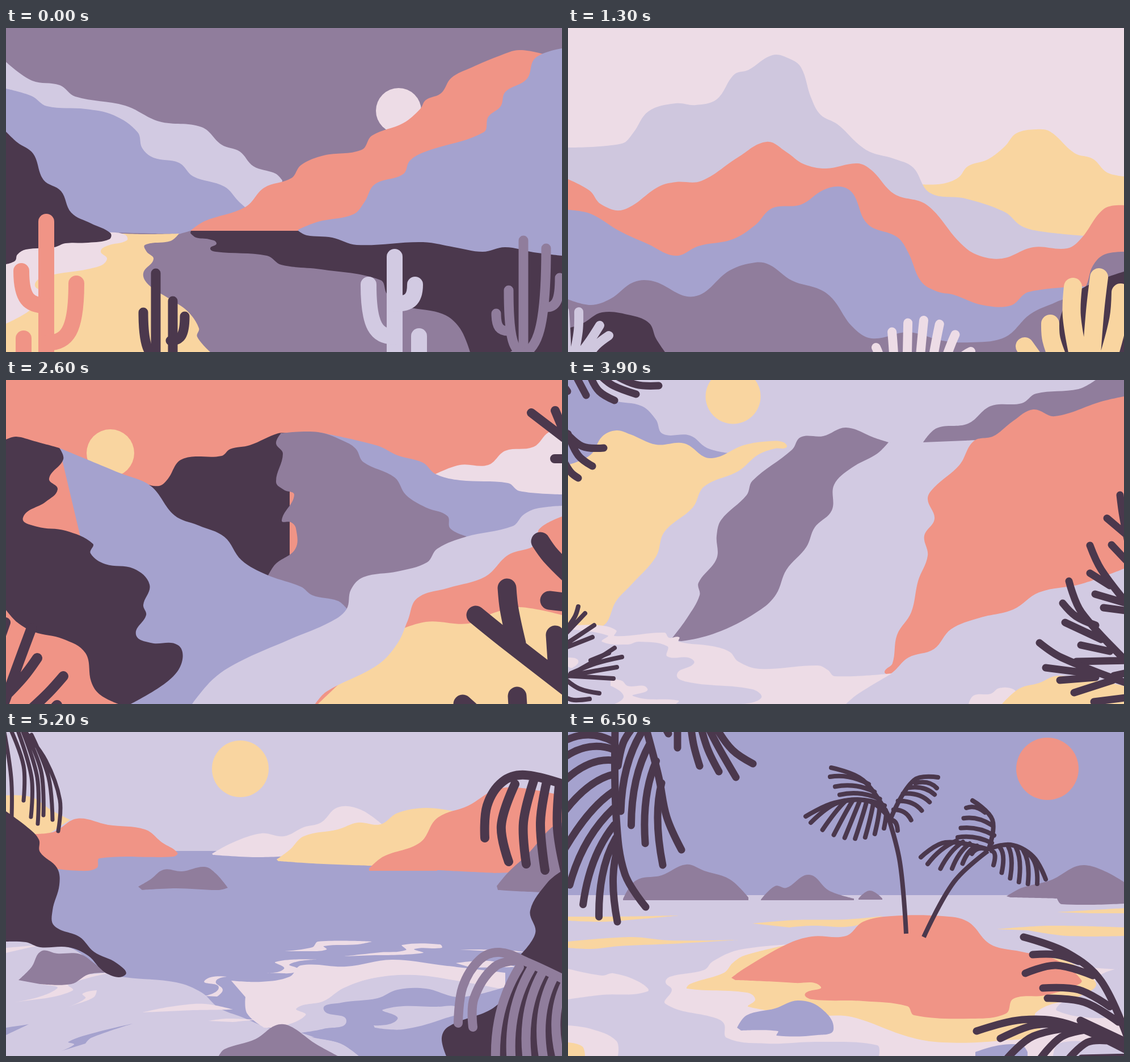
Write an HTML page that moves like this. It is 980 by 572 pixels and loops after 7.8 s.

```html
<!DOCTYPE html>
<html lang="en">
<head>
<meta charset="utf-8">
<title>Six landscapes</title>
<style>
html, body { margin: 0; width: 100%; height: 100%; overflow: hidden; }
svg { display: block; width: 100%; height: 100%; }
</style>
</head>
<body>
<svg id="stage" viewBox="0 0 980 572"></svg>
<script>
const PLUM = '#907d9c', LILAC = '#d2cae2', BLUE = '#a5a2ce', CORAL = '#f09486',
      DARK = '#4b384d', SAND = '#f9d5a0', PINK = '#eddce6', MIST = '#cfc7de';
const HOLD = 1300;
let art = '';

// Smooth curve through "x,y" points; "!" marks a sharp corner.
function curve(text) {
  const pts = text.split(' ').map((s, i, all) => {
    const [x, y] = s.replace('!', '').split(',').map(Number);
    return { x, y, sharp: s.endsWith('!') || i === 0 || i === all.length - 1 };
  });
  const dir = i => {
    if (pts[i].sharp) return [0, 0];
    const dx = pts[i + 1].x - pts[i - 1].x, dy = pts[i + 1].y - pts[i - 1].y;
    const d = Math.hypot(dx, dy) || 1;
    return [dx / d, dy / d];
  };
  return pts.reduce((d, b, i) => {
    if (!i) return `M${b.x} ${b.y}`;
    const a = pts[i - 1], u = dir(i - 1), v = dir(i);
    const k = 0.36 * Math.hypot(b.x - a.x, b.y - a.y);
    return d + `C${a.x + u[0] * k} ${a.y + u[1] * k} ${b.x - v[0] * k} ${b.y - v[1] * k} ${b.x} ${b.y}`;
  }, '');
}

const draw = (color, d) => { art += `<path fill="${color}" d="${d}Z"/>`; };
const stroke = (color, width, d, cap = 'round') => {
  art += `<path fill="none" stroke="${color}" stroke-width="${width}" stroke-linecap="${cap}" d="${d}"/>`;
};
const fill = (color, text) => draw(color, curve(text));
// A ridge closed straight down to a base line.
const land = (color, base, text) => draw(color, `${curve(text)}V${base}H${text.split(',')[0]}`);
const line = (color, width, ...parts) => stroke(color, width, parts.map(curve).join(''));
const trunk = (color, width, x, y) => stroke(color, width, `M${x} ${y}V600`);
const arm = (color, width, x, y, tx, ty) =>
  stroke(color, width, `M${x} ${y}C${x} ${y + (ty - y) * 0.8} ${x + (tx - x) * 0.3} ${ty} ${tx} ${ty}`);
const disc = (color, x, y, r) => { art += `<circle fill="${color}" cx="${x}" cy="${y}" r="${r}"/>`; };
const band = (color, y = 0) => { art += `<rect fill="${color}" y="${y}" width="980" height="${572 - y}"/>`; };

// Point at t on the parabola through three points.
function along(text, t) {
  const [a, m, b] = text.split(' ').map(s => s.split(',').map(Number));
  const s = 2 * t - 1;
  return m.map((v, i) => v + s * (b[i] - a[i]) / 2 + s * s * ((a[i] + b[i]) / 2 - v));
}

// n bent leaflets running from a curve of roots to a curve of tips.
function fan(color, width, n, roots, tips, bx, by) {
  let d = '';
  for (let i = 0; i < n; i++) {
    const [x, y] = along(roots, i / (n - 1)), [p, q] = along(tips, i / (n - 1));
    d += `M${x} ${y}Q${(x + p) / 2 + 2 * bx} ${(y + q) / 2 + 2 * by} ${p} ${q}`;
  }
  stroke(color, width, d);
}

function canyon() {
  band(PLUM);
  land(LILAC, 340, '0,60 46,93 95,101 122,121 210,137 270,165 345,175 380,206 412,218 436,244 475,257 487,269! 480,330');
  disc(PINK, 692, 146, 40);
  land(BLUE, 361, '0,107 45,120 72,138 140,143 190,154 232,184 240,212 260,229 305,238 330,262 385,280 410,306 422,317! 400,358! 325,358! 305,364! 184,361');
  land(CORAL, 358, '325,358 350,341 422,316 455,282 503,265 520,242 560,225 627,215 645,190 700,168 730,143 740,127 767,115 785,88 820,70 870,49 905,39 951,47! 960,60');
  land(BLUE, 410, '515,356 550,342 612,329 632,307 650,276 700,258 712,234 740,218 842,184 850,157 872,138 880,113 918,90 933,53 980,36');
  fill(SAND, '184,362 240,364 305,363! 290,376 245,383 248,395 260,408 242,433 252,454 288,478 320,500 340,530 337,545 360,572! 0,572! 0,480');
  fill(PINK, '0,400 100,370! 180,361 210,365 213,375 180,384 167,394 178,408 160,422 65,440 51,455 70,470 40,500 0,522');
  fill(DARK, '0,183 20,202 48,222 66,268 97,288 115,326 150,345 184,362 182,373 145,379 105,380 85,387 35,391 20,400 16,411 0,417');
  fill(DARK, '326,358 515,358! 530,366 575,370 618,383 735,378 790,387 840,395 880,387 930,396 980,402! 980,572! 818,572! 800,530 770,505 700,490 672,470 660,445 555,426 485,418 460,402 370,395 360,389 371,380 358,373 335,370 325,362');
  trunk(CORAL, 28, 71, 342);
  trunk(CORAL, 28, 31, 548);
  arm(CORAL, 28, 27, 429, 71, 490);
  arm(CORAL, 28, 124, 451, 71, 556);
  trunk(DARK, 17, 264, 433);
  trunk(DARK, 17, 294, 482);
  arm(DARK, 17, 242, 502, 280, 585);
  arm(DARK, 17, 315, 509, 290, 552);
  trunk(LILAC, 28, 685, 404);
  trunk(LILAC, 28, 728, 544);
  arm(LILAC, 28, 639, 453, 685, 545);
  arm(LILAC, 28, 721, 453, 685, 487);
  trunk(PLUM, 17, 912, 375);
  arm(PLUM, 17, 952, 389, 895, 578);
  arm(PLUM, 17, 886, 463, 916, 574);
  arm(PLUM, 17, 864, 504, 886, 535);
  arm(PLUM, 17, 976, 441, 952, 493);
}

function ranges() {
  band(PINK);
  land(SAND, 375, '620,276 660,275 688,264 705,244 740,232 770,209 790,186 825,179 850,183 893,221 925,231 950,255 980,262');
  land(MIST, 420, '0,211 95,204 115,185 142,147 190,133 225,136 262,126 293,82 318,74 360,48 390,54 411,70 428,122 445,153 475,170 525,215 575,231 608,246 638,291 700,301 770,325 800,350 840,360 912,367');
  land(CORAL, 500, '0,267 38,287 58,311 97,321 160,280 190,272 235,270 300,228 350,201 385,219 415,240 455,248 510,239 535,251 575,293 632,312 690,378 720,400 765,407 820,387 880,389 905,371 945,319 980,313');
  land(BLUE, 572, '0,321 40,328 90,358 140,381 190,402 230,385 290,373 330,348 360,318 410,312 450,286 480,280 502,292 528,346 580,369 600,397 622,447 650,465 680,471 730,489 780,490 812,466 920,456');
  land(PLUM, 572, '0,479 40,489 75,478 115,449 150,447 222,474 285,428 330,414 355,418 395,446 445,462 468,480 500,526 535,548 600,537 660,552 710,555 770,546 815,505 860,484 908,462 925,420 945,400 980,395');
  land(DARK, 572, '0,530 25,522 60,502 110,507 143,521 155,548 171,572');
  land(DARK, 572, '862,572 868,510 890,472 930,448 980,430');
  line(MIST, 16, '19,501 18,535 10,580', '-6,500 -4,530 -2,580', '56,525 40,550 18,580', '72,543 50,560 35,580', '0,580 60,582');
  fan(PINK, 16, 7, '552,590 620,590 685,590', '543,564 627,516 710,571', 0, -2);
  line(SAND, 32, '936,440 929,500 922,590', '890,457 888,510 902,590', '850,522 852,550 866,590', '805,562 825,590', '974,467 970,515 950,590');
}

function valley() {
  band(CORAL);
  disc(SAND, 184, 129, 42);
  land(PINK, 210, '757,166 800,150 850,150 880,125 930,118 957,92 980,90');
  fill(BLUE, '555,93 655,116 690,133 735,146 757,166 800,177 885,182 905,196 980,202! 980,235! 800,290! 600,200');
  land(DARK, 330, '245,183 270,187 285,175 310,140 380,134 395,122 430,115 480,94 500,95');
  land(DARK, 347, '300,300 500,300');
  fill(PLUM, '484,94 550,92 600,110 617,122 630,145 685,172 705,203 740,225 778,240 783,262 812,276! 640,410! 570,410! 461,347! 475,325 510,298 511,262 502,251 486,248 508,203 490,194 476,180 488,130 476,112 484,95');
  land(SAND, 572, '550,572 680,447! 740,427 815,430 860,411 905,401 980,415');
  fill(BLUE, '94,120 200,164 255,187 297,239 340,257 385,277 415,318 460,344 520,365 540,380 585,390 601,404! 600,430! 350,572! 205,572! 165,420');
  fill(LILAC, '980,222 935,227 912,238 893,258 810,277 760,298 742,322 690,338 630,348 608,370 600,405 570,428 500,458 410,498 365,528 328,572! 545,572! 565,550 655,503 690,465 708,425 725,385 780,367 845,347 885,309 935,290 940,263 980,241');
  fill(DARK, '0,105 18,100 50,108 94,120! 101,140 76,174 91,193 70,215 30,243 55,259 105,266 153,289 149,306 175,325 225,333 253,361 242,397 247,415 229,449 255,464 303,468 310,498 285,532 220,572! 198,572! 165,555 150,532 140,482 100,457 50,445 20,428 0,406');
  line(DARK, 18, '45,438 22,500 -5,575', '55,491 30,525 -5,562', '101,523 75,552 40,585', '90,574 75,590', '-1,428 -8,448');
  line(DARK, 33, '828,415 880,457 1000,550', '883,367 887,405 900,465', '942,285 960,310 1000,350', '958,389 1000,394', '968,450 973,525', '805,572 825,590', '901,558 903,590');
  line(DARK, 16, '926,58 990,107', '968,54 985,95', '967,139 995,139');
}

function coast() {
  band(LILAC);
  disc(SAND, 291, 29, 48.5);
  land(BLUE, 160, '0,0 40,0! 50,18 80,36 130,46 155,70 167,95 215,98 245,120 282,129! 250,150');
  fill(SAND, '0,150 40,132 60,100 85,89 110,96 155,114 205,112 250,138 310,115 355,108 380,110 385,119 365,121 335,132 300,161 240,188 220,225 170,268 155,312 110,363 85,390 60,435 0,435');
  fill(PLUM, '565,110 540,102 490,84 450,99 410,101 395,123 325,178 315,203 270,247 262,275 262,315 230,358 232,380 210,420 184,455! 200,461 270,443 340,405 367,378 385,335 420,295 435,260 465,230 469,185 500,155 545,130 565,110');
  fill(PLUM, '626,110 650,85 705,77 745,46 800,41 825,24 900,16 930,0! 980,0! 980,60! 740,105! 700,107');
  fill(CORAL, '980,29 940,38 858,64 820,52 785,72 750,99 715,108 690,150 645,190 634,210 646,245 628,275 634,310 617,355 605,410 580,450 572,500 558,515 568,519 600,490 645,475 675,440 725,420 785,405 830,375 905,360 980,333');
  fill(PINK, '0,434 55,433 85,442 82,452 170,446 178,455 196,454 195,462 255,470 285,480 300,497 338,510 440,504 458,512 470,523 571,518! 510,555 490,572! 300,572! 340,562 325,546 215,534 192,520 222,500 212,490 175,488 175,470 125,462 105,467 60,462 70,451 0,440');
  fill(PINK, '75,528 95,531 105,540 140,545 115,558 195,566 190,572! 82,572! 98,558 75,540');
  fill(PINK, '0,490 18,495 8,508 0,506');
  land(PINK, 572, '706,572 715,557 745,554 760,544 785,546 795,560');
  land(SAND, 572, '765,572 795,545 830,535 865,522 980,540');
  line(DARK, 13, '160,10 120,8 80,-10', '120,25 80,10 60,-5', '82,36 55,20 40,-5', '32,27 15,-5', '-1,20 -8,10');
  line(DARK, 13, '63,120 25,117 -8,88', '43,152 18,133 0,95', '18,173 5,163 -8,142');
  line(DARK, 8, '18,400 12,418 -5,442', '30,412 -5,449', '46,433 -5,467', '43,454 -5,473', '72,482 40,495');
  line(DARK, 8, '82,473 40,500 -5,525', '95,489 50,500 5,518', '86,507 40,515 -5,524', '80,527 -5,522', '55,553 20,545 -5,528', '38,563 10,565 -5,560');
  line(DARK, 13, '973,203 978,240 990,300', '950,244 990,278', '958,291 990,325', '920,292 940,335 990,400', '920,341 955,363', '929,378 990,396', '944,402 990,408');
  line(DARK, 13, '883,355 905,410 990,502', '872,394 895,417 930,433', '876,428 940,458', '904,468 955,479', '896,497 990,495');
  line(DARK, 13, '831,464 870,490 990,537', '842,508 920,518', '867,530 930,525', '892,552 960,530', '927,568 990,560', '962,522 990,516');
}

function bay() {
  band(LILAC);
  disc(SAND, 413, 65, 50);
  band(BLUE, 210);
  fill(PINK, '363,215 400,195 450,179 490,184 525,168 555,160 585,133 625,137 665,165! 640,200! 500,219! 440,221 365,217');
  fill(SAND, '477,225 500,208 525,184 585,172 620,160 660,163 690,143 740,134 790,140! 720,236! 640,236! 560,233 480,228');
  land(SAND, 190, '0,112 45,115 80,138 113,155! 60,190');
  land(CORAL, 245, '640,241 665,220 730,195 760,152 815,130 860,103 900,98 980,112! 980,245! 860,249! 760,244');
  fill(CORAL, '50,180 85,176 125,153 180,164 245,172 275,195 302,213 295,220 165,223 160,240 130,245 60,238');
  fill(PLUM, '865,272 885,248 920,215 960,170 980,160! 980,284! 920,282 867,279');
  fill(PLUM, '233,273 255,260 278,243 310,246 350,238 370,250 391,275! 375,279 300,276 240,279');
  land(LILAC, 572, '0,370 110,380 175,425 210,433 300,442 345,460 375,487 415,503 470,525 550,541 590,550 622,572');
  fill(PINK, '397,439 450,441 500,432 520,412 600,414 680,402 770,412 880,425! 880,470! 700,470! 560,500! 500,520 455,522! 425,497 422,468');
  fill(LILAC, '485,520 528,500 512,488 560,475 595,452 650,434 720,429 800,440 880,455! 870,530! 500,540');
  fill(BLUE, '520,531 560,524 600,510 560,490 590,478 655,470 690,455 740,453 800,468 880,450! 880,572! 622,572! 590,550 550,541');
  fill(LILAC, '648,518 690,507 665,490 760,485 800,490 775,505 700,525 650,522');
  fill(PINK, '492,387 540,380 550,370 645,370! 620,375 560,378 565,384 540,387');
  fill(PINK, '596,396 660,389 705,385 698,376 765,375 768,381 720,383 735,390 650,394');
  fill(PINK, '460,425 490,418 475,406 547,402! 500,410 515,420 490,426');
  fill(PINK, '800,384 880,385 920,389! 870,388');
  fill(PINK, '793,408 850,404 900,415! 820,416');
  fill(PINK, '350,466 375,451 350,439 390,432! 370,440 382,455 372,467');
  fill(PINK, '15,477 90,453 60,442 130,430 185,425! 110,446 118,456 70,470');
  fill(PINK, '108,486 140,470 135,462 160,456! 155,468 125,480');
  fill(PINK, '240,495 290,485 350,480 400,490! 330,491');
  fill(PINK, '357,510 390,506 440,508! 400,512');
  fill(PINK, '0,381 60,376! 0,390');
  fill(BLUE, '85,567 120,552 110,547 160,530 223,515! 150,540 140,550');
  fill(BLUE, '0,522 40,516! 0,535');
  fill(DARK, '0,140 40,170 58,190 60,212 90,240 94,270 82,315 85,342 130,362 155,388 195,408 210,429 175,425 145,395 110,380 60,380 35,371 0,370');
  fill(DARK, '980,245 955,265 924,315 933,355 905,395! 870,478 780,520 768,540 776,572! 980,572');
  fill(PLUM, '22,438 45,415 62,387 90,391 130,392 155,408 174,425! 145,428 115,445 60,445');
  land(PLUM, 572, '375,572 385,560 440,542 475,518 500,519 545,550 585,572');
  line(DARK, 7, '30,-5 70,50 95,120 92,175', '45,5 75,80 82,155', '35,0 62,70 66,147', '28,-5 55,80 56,162', '20,-5 45,80 44,150', '8,-5 31,60 31,121', '-4,-5 9,80 10,150');
  line(DARK, 16, '844,187 848,130 875,88 915,76 990,95', '886,229 873,165 897,92', '917,233 912,160 930,86', '950,244 942,160 953,88', '985,245 972,170 975,95');
  line(PLUM, 16, '797,514 805,450 835,402 870,389 920,407 990,440', '823,521 825,470 862,414 905,403');
  fan(PLUM, 16, 5, '905,415 945,425 985,445', '863,580 919,580 978,580', -12, -5);
}

function island() {
  band(BLUE);
  disc(CORAL, 845, 65, 55);
  band(LILAC, 288);
  land(PLUM, 297, '97,295 120,262 165,253 208,234 240,245 285,260 318,292');
  land(PLUM, 297, '340,296 365,272 385,275 425,252 460,280 504,294');
  land(PLUM, 296, '512,294 532,280 554,294');
  fill(PLUM, '773,290 800,275 850,262 910,235 980,265! 980,303! 870,304 862,294! 780,292');
  fill(SAND, '0,326 80,326 195,324! 130,330 60,335 0,333');
  fill(SAND, '0,370 110,362 180,368 300,367! 180,374 90,378 40,383 0,381');
  fill(SAND, '325,338 400,332 490,331 555,325! 500,343 430,342 390,345');
  fill(SAND, '757,348 850,342 980,345! 980,360! 880,360 810,350');
  fill(SAND, '862,318 980,311! 980,320! 920,320');
  fill(PINK, '390,375 300,385 255,405 240,420 180,432 172,442 183,455 172,480 260,505 275,515 280,540 350,550 440,547 545,553 548,572! 980,572! 980,420! 700,400');
  fill(PINK, '0,418 60,430 80,426 125,441 140,458 60,464 0,472');
  land(PINK, 572, '0,518 40,524 85,545 88,572');
  fill(LILAC, '980,415 940,428 920,452 870,478 862,492 930,505 980,500');
  land(LILAC, 572, '855,572 865,550 930,548 980,560');
  fill(SAND, '390,375 310,395 290,408 275,425 215,445 210,453 315,460 330,472 318,485 440,500 500,503 600,538 660,548 760,545 830,530 825,495 905,465 930,442 870,400');
  land(SAND, 572, '0,548 25,555 30,572');
  fill(CORAL, '288,434 310,418 385,375 430,361 490,360 520,335 570,325 660,325 705,335 745,375 800,388 860,402 905,438 895,448 840,465 785,471 772,497 710,506 610,500 598,484 520,475 430,472 418,462 445,449 400,443 295,438');
  fill(BLUE, '298,522 315,500 365,488 405,474 445,487 468,525 440,535 368,536 370,528 305,527');
  land(BLUE, 572, '718,565 760,553 800,553 810,565');
  stroke(DARK, 8, curve('563,145 585,230 596,356') + curve('740,210 680,265 627,362'), 'butt');
  line(DARK, 8, '464,63 520,85 566,150', '652,80 610,85 570,150', '419,149 470,125 530,122 565,150');
  fan(DARK, 8, 4, '530,92 545,112 558,130', '462,79 475,104 486,122', 0, -6);
  fan(DARK, 8, 6, '612,90 586,115 567,155', '650,99 631,131 581,174', 3, -5);
  fan(DARK, 8, 8, '475,125 520,123 560,138', '428,160 497,188 557,170', 2, -5);
  line(DARK, 8, '713,121 748,155 742,205', '622,221 665,195 740,207', '740,207 780,199 820,220 842,260');
  fan(DARK, 8, 4, '735,142 750,174 747,196', '702,134 695,161 687,186', 0, -5);
  fan(DARK, 8, 5, '685,192 708,197 735,206', '634,233 677,241 712,215', -2, -4);
  fan(DARK, 8, 6, '747,210 783,203 815,218', '750,235 787,262 827,268', 4, -5);
  line(DARK, 13, '83,-5 85,150 100,250 137,309', '138,-5 160,80 174,150 200,208');
  fan(DARK, 13, 5, '80,17 80,50 80,105', '-5,15 -5,85 -5,205', 0, -11);
  fan(DARK, 13, 4, '80,135 83,176 88,205', '3,270 40,317 87,335', -8, -8);
  fan(DARK, 13, 4, '130,0 150,35 165,90', '93,140 123,180 167,235', -8, -7);
  line(DARK, 13, '88,60 97,20 112,-5', '177,3 172,-6', '193,28 193,-6', '232,60 222,25 217,-6', '266,70 247,32 235,-6', '296,80 267,30 248,-6', '326,56 290,32 262,-6');
  line(DARK, 13, '803,362 880,390 940,440 990,550', '819,393 860,393 900,405', '806,426 860,412 925,430', '837,452 900,455 955,485', '845,470 910,477 970,512');
  line(DARK, 13, '720,528 800,508 880,515 990,565', '762,541 820,518 880,516', '775,575 820,537 900,520', '830,580 870,538 920,525', '880,580 915,548 950,545', '903,509 990,550', '905,576 990,574');
}

const stage = document.getElementById('stage');
stage.innerHTML = [canyon, ranges, valley, coast, bay, island].map(paint => {
  art = '';
  paint();
  return `<g>${art}</g>`;
}).join('');
const scenes = [...stage.children];

function show(ms) {
  const now = Math.floor(ms / HOLD) % scenes.length;
  scenes.forEach((g, i) => { g.style.display = i === now ? '' : 'none'; });
}

let start = null;
function tick(ms) {
  start ??= ms;
  show(ms - start);
  requestAnimationFrame(tick);
}
show(0);
requestAnimationFrame(tick);
</script>
</body>
</html>
```
